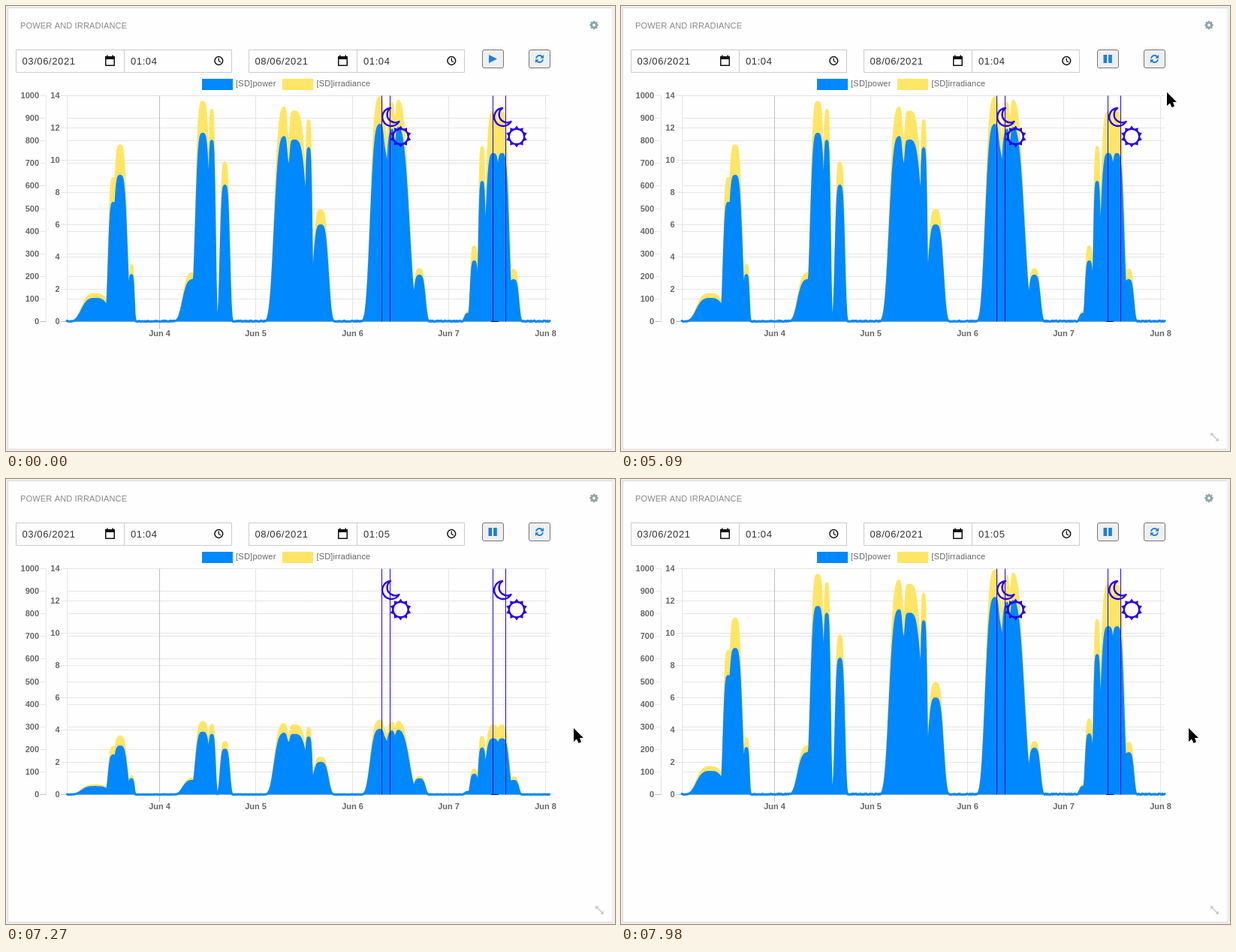
These frames come from a looping animation (811 px wide and 593 px high, 8000 ms). An HTML page with a canvas:

```html
<!DOCTYPE html>
<html lang="en">
<head>
<meta charset="utf-8">
<title>Power and irradiance</title>
<style>
  html, body { margin: 0; width: 100%; height: 100%; overflow: hidden; background: #efefef; }
  canvas { display: block; }
</style>
</head>
<body>
<canvas id="stage" width="811" height="593"></canvas>
<script>
const ctx = document.getElementById('stage').getContext('2d');
const LOOP = 8000, LEFT = 81, RIGHT = 724, TOP = 119.5, BASE = 420.5;
const ACCENT = '#1c7fd6', MARK = '#2600f0', GRID = '#e5e5e5', ZERO = '#bfbfbf';
const POWER = '#0088ff', SUN = '#ffe566';

// Each day is a few humps [centre, half width, height]; negative heights are notches.
const days = [
  { gain: 1.21, humps: [[119, 18, 30], [143, 6, 158], [152, 8.5, 194], [167, 3, 62]] },
  { gain: 1.17, humps: [[250, 14, 55], [262, 9, 250], [274, 4, 241], [291.5, 5.5, 181]] },
  { gain: 1.16, humps: [[372, 14, 246], [384, 17, 241], [403, 3.8, 231], [419, 9.5, 128], [376, 3, -34]] },
  { gain: 1.14, humps: [[499, 13, 262], [519, 17, 259], [550.5, 7, 61], [505, 3.5, -28], [518, 2.5, -22]] },
  { gain: 1.25, humps: [[616, 5, 10], [623.5, 4.5, 80], [634, 4, 186], [649, 10, 223], [660.5, 8.5, 223], [676, 6, 55]] }
];

// Pointer track: time, x, y.
const track = [
  [800, 634, 575], [1510, 674, 267], [1580, 677, 203], [2140, 645, 72], [4520, 645, 72],
  [5090, 727, 115], [5350, 751, 125], [5530, 762, 230], [5660, 756, 332]
];

const arrow = new Path2D('M0 0V18L4 14.5L6.5 20L10 18.5L8 13H13Z');
const hand = new Path2D('M-2 1Q0-1 2 1V7Q4 6 5 8Q7 7 8 9Q11 8 11 11V15L8 18V21H-3V18L-8 12Q-8 9-5 10L-2 12Z');
const moon = new Path2D('M512 136A12 12 0 1 0 523.5 154A10.7 10.7 0 0 1 512 136Z');

function box(x, y, w, h, fill) {
  ctx.fillStyle = fill;
  ctx.fillRect(x, y, w, h);
}

function line(x1, y1, x2, y2, color, width = 1) {
  ctx.strokeStyle = color;
  ctx.lineWidth = width;
  ctx.beginPath();
  ctx.moveTo(x1, y1);
  ctx.lineTo(x2, y2);
  ctx.stroke();
}

function ring(x, y, r, color, width, from = 0, to = 2 * Math.PI) {
  ctx.strokeStyle = color;
  ctx.lineWidth = width;
  ctx.beginPath();
  ctx.arc(x, y, r, from, to);
  ctx.stroke();
}

function polygon(points, color) {
  ctx.fillStyle = color;
  ctx.beginPath();
  points.forEach(([x, y]) => ctx.lineTo(x, y));
  ctx.fill();
}

function text(str, x, y, { size = 11, weight = '', color = '#666', align = 'left', spacing = 0 } = {}) {
  ctx.font = `${weight} ${size}px "Liberation Sans", Arial, sans-serif`;
  ctx.letterSpacing = spacing + 'px';
  ctx.textAlign = align;
  ctx.fillStyle = color;
  ctx.fillText(str, x, y);
}

// Runs draw once per turn, rotated about (x, y).
function spin(x, y, count, draw) {
  for (let i = 0; i < count; i++) {
    ctx.save();
    ctx.translate(x, y);
    ctx.rotate(i * 2 * Math.PI / count);
    draw();
    ctx.restore();
  }
}

function drawCard() {
  box(0, 0, 811, 593, '#efefef');
  box(2, 2, 805, 589, '#d9d9d9');
  box(3, 3, 804, 587, '#fefefe');
  text('POWER AND IRRADIANCE', 19, 30, { color: '#888', spacing: 0.17 });
  spin(783, 25.5, 8, () => box(-1.3, -5.7, 2.6, 3, '#8aa5a8'));
  ring(783, 25.5, 3.1, '#8aa5a8', 2.4);
}

function drawInputs(x, date, time) {
  ctx.strokeStyle = '#cbcbcf';
  ctx.lineWidth = 1;
  ctx.strokeRect(x + 0.5, 58.5, 144, 30);
  ctx.strokeRect(x + 144.5, 58.5, 143, 30);
  const style = { size: 13, color: '#333', spacing: 0.6 };
  text(date, x + 8.5, 78, style);
  text(time, x + 153, 78, style);
  ctx.strokeStyle = '#111';
  ctx.lineWidth = 1.5;
  ctx.strokeRect(x + 119.75, 67.75, 11.5, 11.5);
  box(x + 119, 67, 13, 4, '#111');
  box(x + 121, 65.5, 1.6, 2, '#111');
  box(x + 128.4, 65.5, 1.6, 2, '#111');
  ring(x + 270.3, 73, 5.4, '#111', 1.5);
  line(x + 270.3, 69.5, x + 270.3, 73.5, '#111', 1.3);
  line(x + 270.3, 73.3, x + 273, 75, '#111', 1.3);
}

function drawButton(x, hover, pressed) {
  ctx.beginPath();
  ctx.roundRect(x + 0.5, 58.5, 28, 24, 2.5);
  ctx.fillStyle = pressed ? '#f5f5f5' : hover ? '#e5e5e5' : '#efefef';
  ctx.fill();
  ctx.strokeStyle = pressed ? '#8d8d8d' : hover ? '#4f4f4f' : '#767676';
  ctx.lineWidth = 1;
  ctx.stroke();
}

function drawButtons(t, hover) {
  drawButton(634, hover, t >= 3020 && t < 3150);
  if (t < 3150) {
    polygon([[643, 65], [654, 70.5], [643, 76]], ACCENT);
  } else {
    box(642.5, 65, 4.6, 11, ACCENT);
    box(649.2, 65, 4.6, 11, ACCENT);
  }
  drawButton(696);
  spin(710.5, 70.5, 2, () => {
    ring(0, 0, 4.5, ACCENT, 1.9, Math.PI * 1.05, Math.PI * 1.8);
    polygon([[5.6, -5.5], [5.6, -0.8], [0.9, -0.8]], ACCENT);
  });
}

function drawScale(max, step, labelX, tickX, tickEnd) {
  for (let v = 0; v <= max; v += step) {
    const y = Math.floor(BASE - v / max * (BASE - TOP)) + 0.5;
    const color = v ? GRID : ZERO;
    line(tickX, y, tickEnd, y, color);
    line(LEFT, y, RIGHT, y, color);
    text(v, labelX, y + 3.5, { weight: 'bold', align: 'right' });
  }
  line(tickEnd - 0.5, TOP, tickEnd - 0.5, BASE, GRID);
}

function drawAxes() {
  box(261, 97, 41, 15, POWER);
  text('[SD]power', 306, 107, { spacing: 0.25 });
  box(368, 97, 41, 15, SUN);
  text('[SD]irradiance', 413.5, 107, { spacing: 0.15 });
  drawScale(1000, 100, 44, 45, 54);
  drawScale(14, 2, 71.5, 73, 82);
  for (let i = 0; i < 5; i++) {
    const x = Math.floor(204 + i * 128.5) + 0.5;
    line(x, TOP, x, 430, i ? GRID : ZERO);
    text('Jun ' + (i + 4), x, 440, { weight: 'bold', align: 'center' });
  }
}

// Tallest hump at x, less any notch.
function level(humps, x) {
  let peak = 0, notch = 0;
  for (const [centre, width, height] of humps) {
    const h = height * 2 ** -(Math.abs((x - centre) / width) ** 3.4);
    if (h > 0) peak = Math.max(peak, h);
    else notch += h;
  }
  return Math.max(0, peak + notch);
}

function drawSeries(color, grow, heightAt) {
  ctx.beginPath();
  ctx.moveTo(LEFT, BASE);
  for (let x = LEFT; x <= RIGHT; x++) ctx.lineTo(x, BASE - grow * heightAt(x));
  ctx.lineTo(RIGHT, BASE);
  ctx.fillStyle = ctx.strokeStyle = color;
  ctx.lineWidth = 3;
  ctx.lineJoin = 'round';
  ctx.fill();
  ctx.stroke();
}

function drawChart(grow) {
  const dayAt = x => days[Math.max(0, Math.min(4, Math.floor((x - 75.5) / 128.5)))];
  drawSeries(SUN, grow, x => dayAt(x).gain * level(dayAt(x).humps, x));
  drawSeries(POWER, grow, x => Math.max(level(dayAt(x).humps, x), 1.2 * Math.sin(x * x) ** 4));
}

function drawMarkers() {
  for (const x of [500.5, 511.5, 648.5, 665.5]) line(x, TOP, x, BASE, MARK);
  line(646, BASE, 656, BASE, '#1a00a8');
  for (const [moonShift, sunX] of [[0, 525.5], [149, 680]]) {
    ctx.save();
    ctx.translate(moonShift, 0);
    ctx.strokeStyle = MARK;
    ctx.lineWidth = 2.4;
    ctx.stroke(moon);
    ctx.restore();
    ring(sunX, 174, 10.2, MARK, 2.2);
    spin(sunX, 174, 10, () => polygon([[-3.3, -10], [0, -14.5], [3.3, -10]], MARK));
  }
}

function drawHandle() {
  line(786.5, 570.5, 794.5, 578.5, '#c4c4c4', 1.3);
  polygon([[785, 569], [789.5, 569.5], [785.5, 573.5]], '#c4c4c4');
  polygon([[796, 580], [791.5, 579.5], [795.5, 575.5]], '#c4c4c4');
}

function pointerAt(t) {
  if (t < track[0][0]) return null;
  const next = track.findIndex(key => key[0] > t);
  if (next < 0) return track[track.length - 1].slice(1);
  const [t0, x0, y0] = track[next - 1], [t1, x1, y1] = track[next];
  const k = (t - t0) / (t1 - t0);
  return [x0 + (x1 - x0) * k, y0 + (y1 - y0) * k];
}

// The reload grows the chart from zero with a quartic ease-out.
function growth(t) {
  if (t < 7150) return 1;
  const stepped = 7150 + Math.floor((t - 7150) / 62) * 62;
  return 1 - (1 - (stepped - 7117) / 1000) ** 4;
}

function render(t) {
  const pointer = pointerAt(t);
  const hover = pointer && pointer[0] >= 634 && pointer[0] < 663 && pointer[1] >= 58 && pointer[1] < 83;
  drawCard();
  drawInputs(13, '03/06/2021', '01:04');
  drawInputs(323, '08/06/2021', t < 6160 ? '01:04' : '01:05');
  drawButtons(t, hover);
  drawAxes();
  drawChart(growth(t));
  drawMarkers();
  if (!pointer) return;
  drawHandle();
  ctx.save();
  ctx.translate(Math.round(pointer[0]), Math.round(pointer[1]));
  ctx.fillStyle = '#000';
  ctx.fill(hover ? hand : arrow);
  ctx.restore();
}

const start = performance.now();
function tick() {
  render((performance.now() - start) % LOOP);
  requestAnimationFrame(tick);
}
tick();
</script>
</body>
</html>
```
